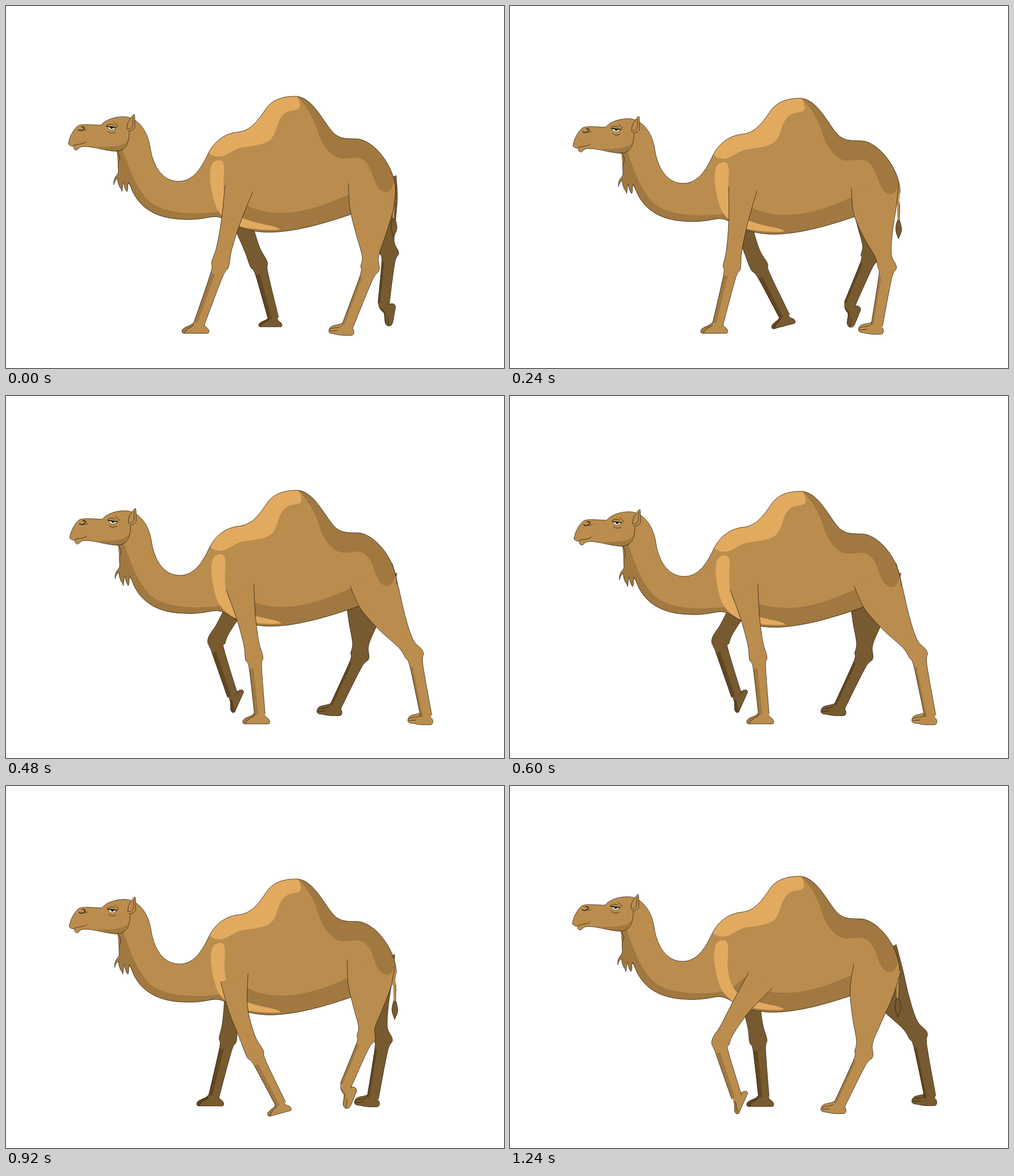
Recreate the animation shown at these times as an HTML page. Size 877x638 px, loop 1280 ms.

```html
<!DOCTYPE html>
<html lang="en">
<head>
<meta charset="utf-8">
<title>Walking camel</title>
<style>
html, body { margin: 0; width: 100%; height: 100%; overflow: hidden; background: #fff; }
svg { display: block; width: 100vw; height: 100vh; }
.line { fill: none; stroke: #1c1409; stroke-width: .7; stroke-linecap: round; stroke-linejoin: round; }
.skin { fill: #ba8d4e; }
.dim { fill: #a07840; }
.lit { fill: #e1aa5f; }
.far .skin { fill: #785a30; }
.far .dim { fill: #61471f; }
</style>
</head>
<body>
<svg viewBox="0 0 877 638">
  <defs><clipPath id="inside"><path id="clip"/></clipPath></defs>
  <g id="farHind" class="far"></g>
  <g id="farFront" class="far"></g>
  <g class="bob">
    <path class="skin" d="M680,340 L681,376 L685,376 C684,366 686,355 685,340Z"/>
    <path class="line" d="M685,346 C686,355 684,366 685,376"/>
    <path class="line" style="fill:#785a30" d="M681,375 C678,382 677,392 680,399 L683,407 C685,400 690,395 688,386 C687,380 686,377 685,375Z"/>
    <path id="skin" class="skin"/>
    <g clip-path="url(#inside)">
      <path class="dim" d="M192,250 L205,252 C214,280 226,314 248,340 C270,364 320,369 372,363 C390,357 404,347 420,331 L423,350 C440,362 470,366 500,364 C540,360 575,346 625,322 L640,370 L560,400 L400,410 L250,390 L180,330Z"/>
      <path class="lit" d="M373,272 C383,270 385,279 384,296 C381,325 386,344 397,361 C408,374 440,382 460,386 C476,389 482,392 482,394 C465,396 432,394 407,387 C390,380 372,366 367,345 C361,325 357,299 361,284 C363,276 367,273 373,272Z"/>
      <path class="lit" d="M355,256 C360,263 369,267 380,265 C393,262 400,252 417,249 C440,246 459,244 468,233 C477,221 477,204 486,194 C495,183 506,185 514,182 C520,179 519,170 511,157 L470,150 L400,210 L350,240Z"/>
      <path class="dim" d="M217,234 C208,246 195,249 160,248 L185,257 L205,255Z"/>
    </g>
    <path class="dim" d="M195,255 L206,256 L225,305 L219,317 L198,290Z"/>
    <path class="line" style="fill:#a07840" d="M195,255 C201,264 202,268 198,275 C196,285 200,292 196,297 C191,303 189,308 190,315 C191,308 194,306 197,304 C196,311 199,315 200,319 C203,322 204,325 204,327 C206,319 205,314 207,310 C208,317 210,324 213,327 C216,323 213,316 216,311 L219,317"/>
    <path id="under" class="line"/>
    <path id="jaw" class="line"/>
  </g>
  <g id="nearHind"></g>
  <g class="bob">
    <path class="dim" clip-path="url(#inside)" d="M511,157 C530,177 541,196 548,218 C554,240 566,260 585,268 C600,272 613,263 627,270 C646,281 645,309 658,323 C666,331 676,329 680,319 C683,312 684,306 690,300 L670,240 L590,215 L540,150Z"/>
    <path id="top" class="line"/>
    <path class="line" style="fill:#ba8d4e" d="M213,217 C213,208 215,204 218,200 C221,196 222,192 226,191 C228,199 226,207 227,214 C224,219 219,221 215,220"/>
    <path class="line" d="M224,196 C222,203 225,209 221,214 C219,217 216,217 214,216 M119,246 C127,242 136,245 141,239 M177,211 C180,207 186,208 190,210 M190,205 L197,211 L193,216 M179,221 C183,225 189,225 193,222 M138,220 L142,217"/>
    <path d="M179,213 C181,220 190,221 192,214Z" fill="#fff" stroke="#1c1409" stroke-width=".6"/>
    <path d="M183,213 C183,218 189,218 189,213Z" fill="#111"/>
    <path class="line" style="stroke-width:1.4" d="M177,212 L193,214 M127,218 C131,221 137,219 138,215 C138,213 135,212 133,213"/>
  </g>
  <g id="nearFront"></g>
</svg>
<script>
const el = id => document.getElementById(id);
const pts = s => s.split(' ').map(p => p.split(',').map(Number));
const mix = (a, b, k) => [a[0] + (b[0] - a[0]) * k, a[1] + (b[1] - a[1]) * k];

// Body: back from muzzle to rump, belly from rump to throat, then the chin
const back = 'M110,243 C111,231 119,217 127,211 C134,207 155,210 167,210 C178,198 195,195 208,195' +
  'C232,196 250,220 254,250 C259,282 275,309 304,309 C332,309 346,281 357,258 C369,236 387,224 410,222' +
  'C435,219 449,193 460,178 C473,163 490,159 512,159 C542,163 558,204 577,224 C592,238 610,232 624,235' +
  'C655,243 686,289 686,325';
const belly = '625,361 C570,381 520,395 480,398 C445,401 415,394 395,382 C380,372 372,370 360,372' +
  'C340,376 325,377 312,376 C258,375 230,350 219,317';
const chin = '192,256 C168,254 150,246 133,248 C128,249 127,254 123,254 C119,252 119,250 119,247' +
  'C114,247 111,246 110,242';
const body = `${back}L683,345L${belly}L205,280L200,256L${chin}Z`;
const shapes = {
  skin: body, clip: body, top: back, under: 'M' + belly,
  jaw: 'M217,222 C217,245 209,256 ' + chin
};
for (const id in shapes) el(id).setAttribute('d', shapes[id]);

// Smooth curve through all points
function spline(p, start = 'M') {
  let d = start + p[0];
  for (let i = 0; i < p.length - 1; i++) {
    const a = p[i - 1] || p[i], b = p[i], c = p[i + 1], e = p[i + 2] || c;
    const h = b.map((n, j) => (n + (c[j] - a[j]) / 6).toFixed(1));
    const k = c.map((n, j) => (n - (e[j] - b[j]) / 6).toFixed(1));
    d += `C${h} ${k} ${c}`;
  }
  return d;
}

// Joints are hip, knee and ankle; bend bows the thigh, far lifts the leg on the other side
const pose = (joints, more) =>
  ({ joints: pts(joints), turn: 0, size: 1, bend: 0, far: -13, lifted: false, ...more });
const between = (a, b, more) =>
  ({ ...a, joints: a.joints.map((p, i) => mix(p, b.joints[i], .5)), bend: (a.bend + b.bend) / 2, ...more });

// Eight poses; the third and seventh lie halfway between their neighbours
function cycle(reach, plant, stand, trail, push, swing, turn) {
  return [reach, plant, between(plant, stand), stand, trail, push,
    between(push, swing, { turn, lifted: false }), swing];
}
const front = cycle(
  pose('410,322 376,460 340,560'),
  pose('410,323 390,464 366,560'),
  pose('412,336 438,466 447,561'),
  pose('404,341 447,472 471,564', { size: .86, bend: -5 }),
  pose('402,338 441,476 484,561', { size: .9, turn: -15, bend: -9 }),
  pose('441,343 369,456 399,548', { size: .9, turn: -66, bend: -5, far: -20 }), -40);
const hind = cycle(
  pose('645,314 641,462 601,565', { far: -17 }),
  pose('643,316 664,460 646,563', { bend: -8 }),
  pose('643,315 719,456 740,564', { bend: -9, far: -16 }),
  pose('646,312 675,440 665,529', { bend: -3, far: -4, lifted: true }),
  pose('643,310 634,444 598,528', { turn: 12, far: -2, lifted: true }),
  pose('647,320 623,472 580,562', { bend: -4, far: -14 }), -35);

// Half widths: [0..1 along the thigh, 1..2 along the shin], and the foot shapes
const kinds = {
  front: {
    girth: pts('0,25 .4,17 .76,13.5 .97,15.5 1.14,11 2,9.3'),
    edge: 'M-9,-3C-14,4 -22,4 -28,9C-31,12 -31,16 -27,17L15,17C19,16 18,10 14,7C11,5 10,4 9,2',
    toe: 'M-9,-3C-14,4 -22,4 -28,9C-31,12 -31,16 -27,17L-25,16C-23,8 -14,7 -9,2Z',
    crease: 'M-25,16C-23,8 -14,7 -9,2',
    shade: .35
  },
  hind: {
    girth: pts('0,42 .3,38 .6,26 .86,14.5 1,16.5 1.18,11.5 2,10'),
    edge: 'M-9,-6C-15,-2 -28,-4 -31,3C-34,8 -32,12 -27,12.5C-20,13 -15,15.5 -5,15.5L8,15.5C12,14 13,10 10,4',
    toe: '',
    crease: 'M-31,5C-25,0 -16,4 -11,-1M-31,8C-27,8 -22,7 -18,7',
    shade: .2
  }
};
const hangingFoot = {
  edge: 'M-9,-2C-9,5 -6,11 0,15C3,20 1,27 3,34C5,39 9,40 13,38C17,36 18,20 21,6C21,0 15,-2 9,1',
  toe: 'M-9,-2C-9,5 -6,11 0,15C3,20 1,27 3,34L6,37C3,28 6,19 3,14C-2,9 -3,5 -4,-1Z',
  crease: 'M9,38C7,32 9,28 8,23'
};

// Point on one side of the leg
function sidePoint(p, at, half) {
  const [hip, knee, ankle] = p.joints;
  const angle = (a, b) => Math.atan2(b[1] - a[1], b[0] - a[0]);
  const thigh = angle(hip, knee), shin = angle(knee, ankle);
  const blend = Math.min(1, Math.max(0, (at - .85) / .3));
  const dir = thigh + (shin - thigh) * blend;
  const [x, y] = at < 1 ? mix(hip, knee, at) : mix(knee, ankle, at - 1);
  const bow = at < 1 ? p.bend * 4 * at * (1 - at) : 0;
  return [x + bow - half * Math.sin(dir), y + half * Math.cos(dir)].map(n => +n.toFixed(1));
}

function legMarkup(p, name) {
  const kind = kinds[name], foot = p.lifted ? hangingFoot : kind;
  const lead = kind.girth.map(([at, w]) => sidePoint(p, at, w));
  const rear = kind.girth.map(([at, w]) => sidePoint(p, at, -w));
  const [knee, heel] = lead.slice(-2), [calf, end] = rear.slice(-2);
  const strip = [knee, heel, mix(heel, end, kind.shade), mix(knee, calf, kind.shade)];
  const front = spline(lead), behind = spline(rear);
  return `<g transform="translate(${p.joints[2]}) rotate(${p.turn}) scale(${p.size})">
    <path class="skin" d="${foot.edge}Z"/><path class="dim" d="${foot.toe}"/>
    <path class="line" d="${foot.edge}${foot.crease}"/><circle class="skin" r="9"/></g>
    <path class="skin" d="${front}${spline([...rear].reverse(), 'L')}Z"/>
    <path class="dim" d="M${strip.join('L')}Z"/>
    <path class="line" d="${front}${behind}"/>`;
}

const legs = {
  Front: { poses: front, art: front.map(p => legMarkup(p, 'front')) },
  Hind: { poses: hind, art: hind.map(p => legMarkup(p, 'hind')) }
};
const bobs = document.querySelectorAll('.bob');

let shown = -1;
function draw(ms) {
  const step = Math.floor(ms % 1280 / 40);
  if (step === shown) return;
  shown = step;
  // The body sinks and rises steadily; the legs change pose every four steps
  const sink = 1 - Math.abs(step - 15.5) / 15.5;
  bobs.forEach(g => g.setAttribute('transform', `translate(${3 * sink} ${9.2 * sink})`));
  const near = step >> 2, far = (near + 4) % 8;
  for (const name in legs) {
    const { poses, art } = legs[name];
    el('near' + name).innerHTML = art[near];
    el('far' + name).innerHTML = art[far];
    el('far' + name).setAttribute('transform', `translate(0 ${poses[far].far})`);
  }
}

const begin = performance.now();
function tick() {
  draw(performance.now() - begin);
  requestAnimationFrame(tick);
}
tick();
</script>
</body>
</html>
```
